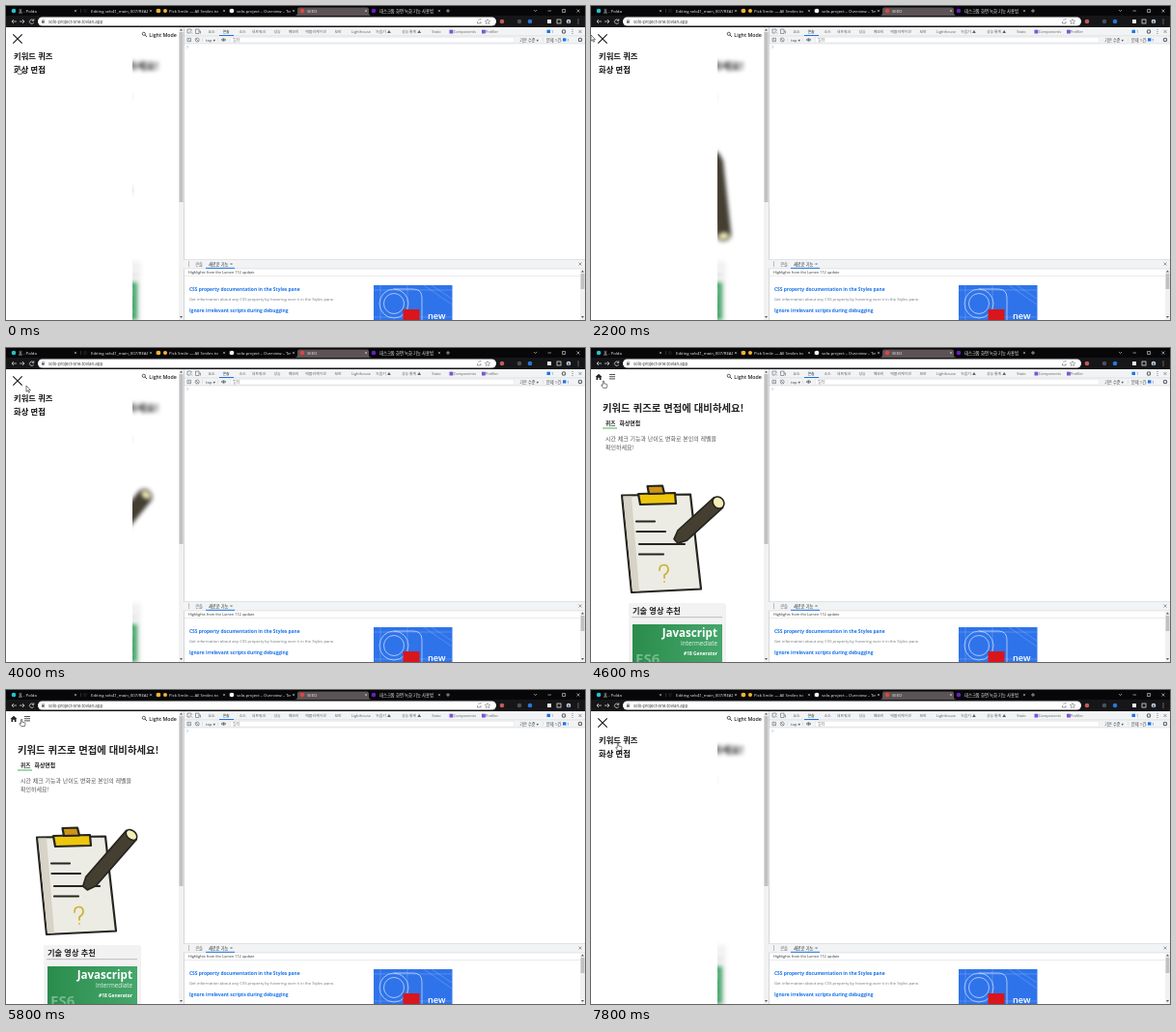
Animation, 600 px wide and 325 px high, one loop 8000 ms. Source, as an HTML page:

```html
<!DOCTYPE html>
<html lang="ko">
<head>
<meta charset="utf-8">
<style>
html, body { margin: 0; width: 100%; height: 100%; overflow: hidden; background: #fff; }
svg { display: block; width: 600px; height: 325px; }
svg svg { width: auto; height: auto; }
text { font-family: "Open Sans", "Noto Sans CJK KR", "Noto Sans CJK", sans-serif; white-space: pre; }
.ko { font-family: "Noto Sans CJK KR", "Noto Sans CJK", sans-serif; }
</style>
</head>
<body>
<svg id="stage" viewBox="0 0 600 325" xmlns="http://www.w3.org/2000/svg"></svg>
<script>
const LOOP = 8000, PENCIL_LOOP = 5100, CLOSE = 4600, OPEN = 6150, SLIDE = 320, MENU_W = 131;
const BLUE = '#1a73e8', GREY = '#5f6368';

const rect = (x, y, w, h, fill, extra = '') =>
  `<rect x="${x}" y="${y}" width="${w}" height="${h}" fill="${fill}" ${extra}/>`;
const dot = (x, y, r, fill) => `<circle cx="${x}" cy="${y}" r="${r}" fill="${fill}"/>`;
const line = (d, stroke, w = 1, extra = '') =>
  `<path d="${d}" fill="none" stroke="${stroke}" stroke-width="${w}" ${extra}/>`;
const text = (x, y, size, str, fill = '#222', weight = 400, extra = '') =>
  `<text x="${x}" y="${y}" font-size="${size}" fill="${fill}" font-weight="${weight}" ${extra}>${str}</text>`;
const clip = (id, x, y, w, h, body) =>
  `<clipPath id="${id}"><rect x="${x}" y="${y}" width="${w}" height="${h}"/></clipPath><g clip-path="url(#${id})">${body}</g>`;
const mid = 'text-anchor="middle"', end = 'text-anchor="end"', ko = 'class="ko"';
const cross = (x, y, r, c, w = .6) => line(`M${x - r} ${y - r}l${2 * r} ${2 * r}m0 ${-2 * r}l${-2 * r} ${2 * r}`, c, w);
const dots = (x, y, c) => [-2, 0, 2].map(d => dot(x, y + d, .5, c)).join('');
const gear = (x, y) => `<circle cx="${x}" cy="${y}" r="1.7" fill="none" stroke="${GREY}" stroke-width="1.1"/>`;

function browser() {
  const tabs = [
    [8, 13, 72, '#20c4cb', '홈 - Polda'],
    [82, 88, 150, '#161616', 'Editing seb41_main_007/READ'],
    [158, 169, 226, '#f5b52e', 'Pick Smile — All Smiles to'],
    [234, 239, 298, '#f4f4f4', 'solo-project – Overview – Tovian'],
    [307, 312, 373, '#e5433d', 'SEED'],
    [381, 387, 449, '#6a1fc0', '데스크톱 화면 녹화 기능 사용법']
  ];
  let s = rect(0, 0, 600, 22, '#070709') + rect(0, 10, 600, 12, '#161618') +
    `<path d="M299 10q3 0 3-3V3.500q0-2 2-2h70q2 0 2 2V7q0 3 3 3z" fill="#5c5356"/>`;
  tabs.forEach(([ix, x, cx, c, str], i) => {
    s += dot(ix, 5, 2.3, c) + clip('tab' + i, x, 0, cx - x - 3, 10, text(x, 6.7, 4.3, str, '#eee'));
    s += cross(cx, 5, 1.1, '#ddd', .5);
    if (i < 3) s += rect(cx + 5, 3, .5, 4, '#555');
  });
  s += dot(165, 5, 2, '#f5b52e') + line('M456 5h4m-2-2v4', '#ddd', .6);
  s += line('M547 4l1.500 1.500 1.500-1.500M561.500 5h3.500M576.500 3.500h3v3h-3z', '#ddd', .6) + cross(593, 5, 1.5, '#ddd');
  s += line('M11 16H6m2-2l-2 2 2 2M14 16h5m-2-2l2 2-2 2M28.500 15a2.200 2.200 0 1 0 .2 2M28.800 13.300v2h-2', '#e8e8e8', .7);
  s += rect(33, 11.5, 475, 9, '#fff', 'rx="4.5"') + rect(37, 15.3, 2.8, 2.4, '#666') +
    line('M37.500 15.500v-1q1-1.500 2 0v1', '#666', .5) + text(44, 17.7, 4.4, 'solo-project-one.tovian.app', '#333');
  s += line('M488.500 16v2h3.500v-2M489.500 15q1-2 3-1.500', GREY, .6) +
    `<path d="M499 13.500l.8 1.700 1.900.2-1.400 1.300.4 1.900-1.700-1-1.700 1 .4-1.900-1.400-1.300 1.900-.2z" fill="none" stroke="${GREY}" stroke-width=".5"/>`;
  [[514, '#c45a5a'], [532, '#4a5058'], [543, '#2878d8'], [583, '#c9d6e4']]
    .forEach(([x, c]) => s += dot(x, 16, 2.3, c));
  s += rect(561, 14, 4, 4, '#eee') + rect(571, 14, 4, 4, 'none', 'stroke="#ddd" stroke-width=".8"');
  return s + text(583, 17.5, 3.8, 'B', '#345', 600, mid) + dots(593, 16, '#ddd');
}

function devtools() {
  let s = rect(184, 22, 416, 303, '#fff') + rect(184, 22, 416, 17, '#f1f3f4') +
    rect(184, 30.7, 416, .5, '#cacdd1') + rect(184, 38.7, 416, .5, '#cacdd1') + rect(184, 22, .6, 303, '#b9bcc0');
  s += line('M191 28h-3v-4h4v2m-1.500 0l2.500 2.500M196.500 24h3.500v4.500h-3.500zM200 26h1.500v2.500', GREY, .6);
  [[213, '요소'], [228, '콘솔'], [245, '소스'], [262, '네트워크'], [281, '성능'], [298, '메모리'], [321, '애플리케이션'],
   [344, '보안'], [368, 'Lighthouse'], [391, '녹음기 ▲'], [420, '성능 통계 ▲'], [446, 'Stato'], [475.5, 'Components'], [503.5, 'Profiler']]
    .forEach(([x, str], i) => s += text(x, 28.2, 3.9, str, i === 1 ? '#222' : GREY, 400, mid));
  s += rect(221, 30, 15, 1, BLUE) + rect(459.5, 24.7, 3.8, 3.8, '#7a55d8') + rect(493, 24.7, 3.8, 3.8, '#7a55d8');
  s += rect(560.5, 24.7, 3.5, 3.3, BLUE) + text(565, 28.2, 4, '1', BLUE) + gear(578, 26.5) + dots(587, 26.5, GREY) + cross(595, 26.5, 1.5, GREY);
  s += line('M188 33.300h3.500v3.400h-3.500zM189 34.500l1.500 1M196.700 33.700l3 3', GREY, .6) +
    `<circle cx="198.200" cy="35" r="2" fill="none" stroke="${GREY}" stroke-width=".6"/>`;
  s += text(207, 36.6, 4.2, 'top ▾', '#444') + rect(203.500, 33, .4, 4, '#ccc') + rect(219, 33, .4, 4, '#ccc') +
    line('M223 35q2.500-3 5 0q-2.500 3-5 0z', GREY, .7) + dot(225.500, 35, .9, GREY);
  s += rect(232.500, 32.300, 294, 5.600, '#fff', 'stroke="#dadce0" stroke-width=".4"') + text(235, 36.5, 4, '필터', '#777');
  s += text(542, 36.5, 4.2, '기본 수준 ▾', '#444', 400, mid) + text(560, 36.5, 4.2, '문제 1건:', '#444') +
    rect(577, 33.3, 3.4, 3.2, BLUE) + text(581.5, 36.5, 4, '1', BLUE) + rect(556, 33, .4, 4, '#ccc') + gear(595, 35);
  s += line('M187.500 41l1.300 1.300-1.300 1.300', '#6f9be0', .6);

  s += rect(184, 262.300, 416, 9.700, '#f1f3f4') + rect(184, 262, 416, .5, '#cacdd1') + rect(184, 271.700, 416, .5, '#cacdd1');
  s += dots(189.500, 267, GREY) + text(200, 268.6, 4.2, '콘솔', GREY, 400, mid) + text(210, 268.6, 4.2, '새로운 기능', '#222') +
    cross(233.500, 267, 1, '#444', .5) + rect(207, 270.800, 30, 1, BLUE) + cross(595, 267, 1.500, GREY);
  s += text(189, 277.2, 3.8, 'Highlights from the Lumen 112 update', '#333') + rect(184, 279.500, 411, .5, '#d5d7da');
  s += text(190, 294.7, 4.9, 'CSS property documentation in the Styles pane', BLUE, 700) +
    text(190, 305, 4.15, 'Get information about any CSS property by hovering over it in the Styles pane.', '#70757a') +
    text(190, 317, 4.9, 'Ignore irrelevant scripts during debugging', BLUE, 700);
  s += rect(381, 289, 81.500, 36, '#2f73ea') + clip('promo', 381, 289, 81.500, 36,
    `<g transform="translate(381 289)" fill="none" stroke="#c3d8fc" stroke-width=".8">
      <circle cx="21" cy="19" r="15"/><circle cx="21" cy="19" r="10.500"/>
      <path d="M0 5H81M7 0V36M35 0V36M0 33H81M52 0L81 20M60 0L81 14" stroke-width=".5" opacity=".5"/>
      <path d="M21 4H41Q50 4 50 13V36"/></g>`);
  s += rect(411.500, 314, 17, 17, '#d8161c') + text(437, 324, 9.2, 'new', '#fff', 600);
  return s + rect(595, 272, 5, 53, '#f1f1f1') + rect(595.600, 277, 3.800, 16, '#c1c1c1') +
    `<path d="M596 275.500l1.500-2 1.500 2zM596 321l1.500 2 1.500-2z" fill="#555"/>`;
}

function page() {
  let s = text(12, 66.4, 10.4, '키워드 퀴즈로 면접에 대비하세요!', '#222', 700, ko);
  s += text(15, 80, 5.6, '퀴즈', '#222', 700, ko) + text(29.500, 80, 5.9, '화상면접', '#222', 700, ko) + rect(12, 82.500, 15, 1, '#3fb562');
  s += text(15, 96, 6, '시간 체크 기능과 난이도 변화로 본인의 레벨을', '#555', 400, ko) + text(15, 104.8, 6, '확인하세요!', '#555', 400, ko);
  s += `<g stroke="#25241f" stroke-width="2.200" stroke-linejoin="round" stroke-linecap="round">
    <path d="M32 152.500L103 151.500L114 249.500L42 253Z" fill="#ecebe4"/>
    <path d="M33.500 153.500H42L50 251.500L43 252Z" fill="#d8d3c7" stroke="none"/>
    <path d="M49 151L87 150L88 161L51 162Z" fill="#eec70c"/>
    <path d="M58.500 143L74 142.500L76 150.500L60 151Z" fill="#cf9414"/>
    <path d="M47 179.500H66M47.500 190H77M50 203H97M50 213.500H75" fill="none"/></g>`;
  s += line('M71 230Q71 224.500 75.500 224.500T80 229.500Q80 232.500 76 235V238M76 241.800v.2', '#cfb02a', 1.7, 'stroke-linecap="round"');
  s += `<g id="pencil" stroke="#25241f" stroke-width="1.600" stroke-linejoin="round">
    <path id="shaft" fill="#453f32"/><ellipse id="butt" ry="6.500" fill="#f6eeb8"/></g>`;
  s += rect(39.500, 265.500, 100, 70, '#d2d2d2', 'opacity=".6"') + rect(39, 264, 100, 70, '#f2f2f2') +
    text(43, 275.2, 8.2, '기술 영상 추천', '#222', 700, ko) + rect(42, 278.500, 94, .6, '#999');
  s += `<linearGradient id="green"><stop stop-color="#2a8c4c"/><stop offset="1" stop-color="#46a76c"/></linearGradient>` +
    rect(43, 286, 93, 39, 'url(#green)') + text(46, 327, 15, 'ES6', '#74b98f', 700);
  return s + text(131, 299, 11.6, 'Javascript', '#fff', 700, end) + text(131, 308, 6.3, 'Intermediate', '#e4f4ea', 400, end) +
    text(131, 318, 4.9, '#18 Generator', '#fff', 700, end);
}

const header = `<path d="M4.500 30L8 26.700L11.500 30H10.500V33H8.800V30.800H7.200V33H5.500V30Z" fill="#222"/>` +
  line('M19 27.500h6M19 29.700h6M19 31.900h6', '#222', .8) +
  '<circle cx="142.800" cy="28.800" r="1.600" fill="none" stroke="#222" stroke-width=".7"/>' + line('M144 30l2 2', '#222', .8) +
  text(148.3, 31.8, 5.3, 'Light Mode', '#222', 600);

const scrollbar = rect(179, 22, 5, 303, '#f1f1f1') + rect(179.500, 27, 4, 176, '#c1c1c1') +
  '<path d="M180 25.500l1.500-2 1.500 2zM180 321l1.500 2 1.500-2z" fill="#555"/>';

const menu = rect(0, 22, MENU_W, 303, '#fff') + cross(12, 34, 4.7, '#111', 1.1) +
  text(8, 55.3, 8.3, '키워드 퀴즈', '#111', 700, ko) + text(8, 68.9, 8.3, '화상 면접', '#111', 700, ko);

const $ = id => document.getElementById(id);
$('stage').innerHTML = rect(0, 0, 600, 325, '#fff') +
  clip('view', 0, 22, 179, 303, `<g id="page">${page()}</g>${header}<g id="menu">${menu}</g>`) +
  scrollbar + devtools() + browser() +
  `<g id="cursor" fill="#fff" stroke="#222" stroke-width=".6" stroke-linejoin="round">
    <path id="arrow" d="M0 0V6.200L1.500 4.900L2.500 7.200L3.500 6.800L2.500 4.600H4.400Z"/>
    <path id="hand" d="M-.7 .6Q0-.5 .7 .6V3L3.400 3.600Q4 4 3.800 5.500L3.200 7.500H-.3L-2.300 4.800Q-2.300 3.700-.7 4.600Z"/></g>`;

// Rows are [ms, ...values]; values ease from one row to the next.
function at(keys, t) {
  const i = Math.max(1, keys.findIndex(k => k[0] >= t));
  const a = keys[i - 1], b = keys[i], u = (t - a[0]) / (b[0] - a[0]), e = u * u * (3 - 2 * u);
  return a.slice(1).map((v, j) => v + (b[j + 1] - v) * e);
}

// tip x, tip y, butt x, butt y
const pencilKeys = [
  [0, 97, 163, 122, 191], [100, 96, 162, 118, 185.5], [700, 82, 205, 130, 150], [1200, 88, 232, 139, 140],
  [1700, 105, 200, 143, 175], [2200, 128, 152, 137.5, 238], [2700, 95, 165, 112, 205], [3300, 82, 215, 133, 150],
  [4000, 92, 217, 145, 152], [4600, 88, 200, 132, 160], [PENCIL_LOOP, 97, 163, 122, 191]
];
const cursorKeys = [
  [0, 13, 63], [1200, 17, 41], [1800, 14, 34], [2200, 0, 30], [2900, 1, 27], [3600, 19, 37], [4000, 21, 39],
  [4500, 13, 34], [5200, 12, 31], [5700, 15, 30], [6100, 22, 31], [6500, 22, 31], [7200, 25, 47], [7800, 28, 55], [LOOP, 28, 55]
];

function drawPencil(t) {
  const [x, y, bx, by] = at(pencilKeys, t % PENCIL_LOOP);
  const len = Math.hypot(bx - x, by - y), turn = Math.atan2(by - y, bx - x) * 180 / Math.PI;
  $('pencil').setAttribute('transform', `translate(${x} ${y}) rotate(${turn})`);
  $('shaft').setAttribute('d', `M0-3L9-7H${len}V7H9L0 3Z`);
  $('butt').setAttribute('cx', len);
  $('butt').setAttribute('rx', Math.max(4.5, 7 * Math.sqrt(Math.max(0, 1 - (len / 95) ** 2))));
}

function draw(now) {
  const t = now % LOOP, open = t < CLOSE || t >= OPEN;
  drawPencil(t);
  const rest = t >= OPEN ? Math.max(0, 1 - (t - OPEN) / SLIDE) ** 3 : 0;
  $('menu').setAttribute('transform', `translate(${-MENU_W * rest} 0)`);
  $('menu').style.display = open ? '' : 'none';
  $('page').style.filter = open ? 'blur(1.9px)' : 'none';
  const hand = t < 500 || (t >= CLOSE && t < OPEN) || t > 7200;
  $('arrow').style.display = hand ? 'none' : '';
  $('hand').style.display = hand ? '' : 'none';
  $('cursor').setAttribute('transform', `translate(${at(cursorKeys, t)})`);
}

const start = performance.now();
(function tick() {
  draw(performance.now() - start);
  requestAnimationFrame(tick);
})();
</script>
</body>
</html>
```
